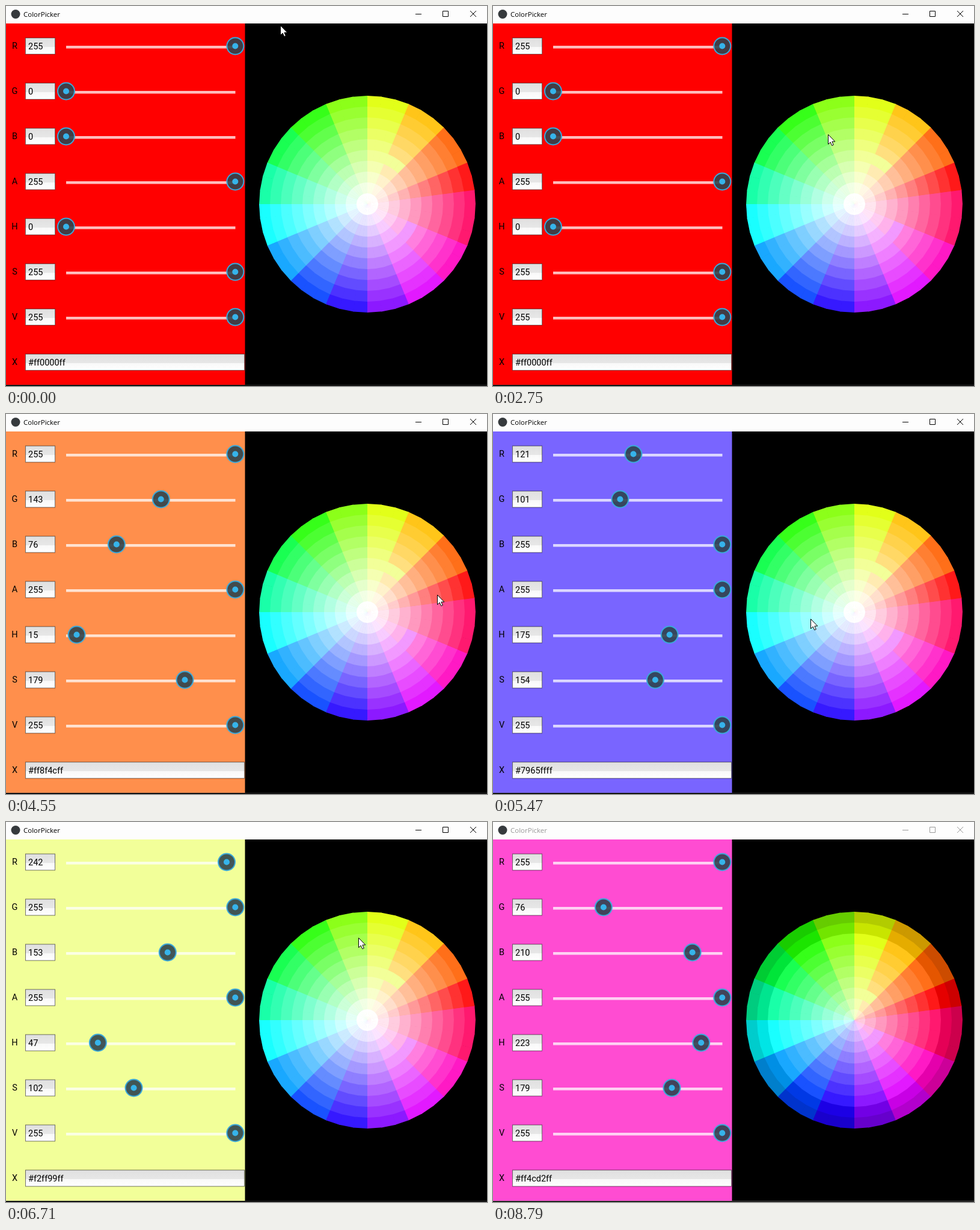
These frames come from a looping animation (800x631 px, 8.89 s). An HTML page with a canvas:

```html
<!DOCTYPE html>
<html lang="en">
<head>
<meta charset="utf-8">
<title>ColorPicker</title>
<style>
  html, body { margin: 0; width: 100%; height: 100%; overflow: hidden; background: #000; }
  canvas { display: block; }
</style>
</head>
<body>
<canvas id="stage" width="800" height="631"></canvas>
<script>
const ctx = document.getElementById('stage').getContext('2d');
const LOOP = 8890, BLUR_AT = 8790, FIRST_PICK = 2800;
const GLIDE = 270, REST = 120, STEP = 135;
const CX = 601, CY = 329, RADIUS = 180, RINGS = 10, WEDGES = 16, SLICES = 48;
const TAU = Math.PI * 2;

// Pointer stops: arrival time, x, y
const stops = [
  [550, 449, 134], [1630, 510, 248], [2200, 530, 235], [2750, 557, 213],
  [2880, 558, 214], [3450, 630, 215], [3820, 707, 235], [4400, 717, 300],
  [4920, 585, 440], [5470, 528, 340], [5860, 530, 310], [6160, 540, 270],
  [6430, 617, 250], [6710, 586, 192], [7130, 500, 400], [7560, 590, 430],
  [7700, 616, 433], [8090, 690, 370], [8390, 742, 390]
];

// The wheel is scrolled outwards by two rings
const shiftAt = t => t < 7000 ? 0 : t < 7140 ? 1 : 2;

const polar = (x, y) => [Math.atan2(y - CY, x - CX), Math.hypot(x - CX, y - CY)];

// Wheel cell under a point, as [hue in sixteenths, saturation]
function cellAt(x, y, shift) {
  const [a, r] = polar(x, y);
  const wedge = Math.floor((1 - a / TAU) % 1 * WEDGES);
  return [wedge, (Math.floor(r / RADIUS * RINGS) + shift) / 10];
}

// Glide part of the way around the wheel centre
function glide(x, y, ex, ey, p) {
  const [a, r] = polar(x, y), [ea, er] = polar(ex, ey);
  const turn = ea - a - TAU * Math.round((ea - a) / TAU);
  const na = a + turn * p, nr = r + (er - r) * p;
  return [Math.round(CX + nr * Math.cos(na)), Math.round(CY + nr * Math.sin(na))];
}

// Each glide starts by picking the cell where the pointer rested
function stateAt(t) {
  let pos = [456, 32], cell = [0, 1], last = -REST;
  for (const [arrive, x, y] of stops) {
    const start = Math.max(last + REST, arrive - GLIDE);
    if (t < start) break;
    if (start > FIRST_PICK) cell = cellAt(...pos, shiftAt(start));
    const steps = 1 + Math.floor((arrive - start) / STEP);
    const done = Math.min(steps, 1 + Math.floor((t - start) / STEP));
    pos = glide(...pos, x, y, done / steps);
    if (done < steps) break;
    last = arrive;
  }
  return { pos, cell };
}

// Single precision keeps the truncated channel values right
function hsv(hue, s, v = 1) {
  return [5, 3, 1].map(n => {
    const k = (n + hue * 6 / WEDGES) % 6;
    const drop = Math.max(0, Math.min(k, 4 - k, 1));
    return Math.floor(Math.fround(1 - Math.fround(s * drop)) * v * 255);
  });
}

function hueAndSat([r, g, b]) {
  const max = Math.max(r, g, b), d = max - Math.min(r, g, b);
  const h = max === r ? ((g - b) / d + 6) % 6 : max === g ? (b - r) / d + 2 : (r - g) / d + 4;
  return [h / 6 * 255, d / max * 255];
}

function rect(x, y, w, h, fill) {
  ctx.fillStyle = fill;
  ctx.fillRect(x, y, w, h);
}

function disc(x, y, r, fill) {
  ctx.fillStyle = fill;
  ctx.beginPath();
  ctx.arc(x, y, r, 0, TAU);
  ctx.fill();
}

function text(str, x, y, font, fill = '#000', align = 'left') {
  ctx.font = font;
  ctx.fillStyle = fill;
  ctx.textAlign = align;
  ctx.fillText(str, x, y);
}

function titleBar(active) {
  const ink = active ? '#000' : '#999';
  rect(0, 0, 800, 29, '#fdfdfd');
  disc(16, 13.5, 7.5, '#363a3d');
  text('ColorPicker', 29, 18, '11.5px "Open Sans", "Noto Sans", sans-serif', ink);
  ctx.strokeStyle = ink;
  ctx.lineWidth = 1;
  ctx.beginPath();
  ctx.moveTo(681, 13.5); ctx.lineTo(691, 13.5);
  ctx.rect(726.5, 8.5, 9, 9);
  ctx.moveTo(772, 8); ctx.lineTo(782, 18);
  ctx.moveTo(782, 8); ctx.lineTo(772, 18);
  ctx.stroke();
}

function row(i, label, value, width) {
  const y = 66.5 + 75 * i, font = '14.5px Roboto, sans-serif';
  text(label, 14.5, y + 4.5, font, '#000', 'center');
  const shade = ctx.createLinearGradient(0, y - 13.5, 0, y + 13.5);
  shade.addColorStop(0, '#e0e0e0');
  shade.addColorStop(.55, '#e7e7e7');
  shade.addColorStop(.55, '#f8f8f8');
  shade.addColorStop(1, '#fff');
  rect(32, y - 13.5, width, 27, shade);
  ctx.strokeStyle = 'rgba(0,0,0,.55)';
  ctx.lineWidth = 1;
  ctx.strokeRect(32.5, y - 13.5, width - 1, 27);
  text(value, 37, y + 5.5, font);
}

function slider(i, value) {
  const y = 66.5 + 75 * i, x = 100 + value / 255 * 281.3;
  rect(100, y - .5, 281.5, 4.5, 'rgba(255,255,255,.74)');
  disc(x, y, 14, 'rgba(45,66,76,.9)');
  ctx.strokeStyle = '#3aa9db';
  ctx.lineWidth = 2;
  ctx.stroke();
  disc(x, y, 5, '#36b3ea');
}

function panel(rgb) {
  rect(0, 29, 397.5, 600, `rgb(${rgb})`);
  [...rgb, 255, ...hueAndSat(rgb), 255].forEach((v, i) => {
    row(i, 'RGBAHSV'[i], Math.floor(v), 50);
    slider(i, v);
  });
  const hex = [...rgb, 255].map(v => v.toString(16).padStart(2, '0')).join('');
  row(7, 'X', '#' + hex, 365);
}

function wheel(shift) {
  for (let ring = RINGS; ring >= 1; ring--) {
    const level = ring - 1 + shift;
    const s = Math.min(level, 10) / 10, v = level < 10 ? 1 : (19 - level) / 10;
    const r = RADIUS * ring / RINGS;
    for (let i = 0; i < SLICES; i++) {
      let hue = i ? Math.floor(i / 3) : 15;
      // Neighbouring wedges share a tint in this band
      if (level === 4) hue = { 2: 3, 14: 13 }[hue] ?? hue;
      const a = -TAU * i / SLICES, b = -TAU * (i + 1) / SLICES - .004;
      ctx.fillStyle = `rgb(${hsv(hue, s, v)})`;
      ctx.beginPath();
      ctx.moveTo(CX, CY);
      ctx.lineTo(CX + r * Math.cos(a), CY + r * Math.sin(a));
      ctx.lineTo(CX + r * Math.cos(b), CY + r * Math.sin(b));
      ctx.fill();
    }
  }
}

const arrow = new Path2D('M0 0V16L3.7 12.6L6.2 18.2L8.8 17.1L6.4 11.6H11.3Z');

function pointer([x, y]) {
  ctx.save();
  ctx.translate(x + .5, y + .5);
  ctx.fillStyle = '#fff';
  ctx.fill(arrow);
  ctx.strokeStyle = '#000';
  ctx.lineWidth = 1;
  ctx.stroke(arrow);
  ctx.restore();
}

function draw(t) {
  const active = t < BLUR_AT, { pos, cell } = stateAt(t);
  rect(0, 0, 800, 631, '#000');
  titleBar(active);
  panel(hsv(...cell));
  wheel(shiftAt(t));
  rect(0, 629, 800, 1, active ? '#2b2b2b' : '#555');
  if (active) pointer(pos);
}

const began = performance.now();
function tick() {
  draw((performance.now() - began) % LOOP);
  requestAnimationFrame(tick);
}
tick();
</script>
</body>
</html>
```
